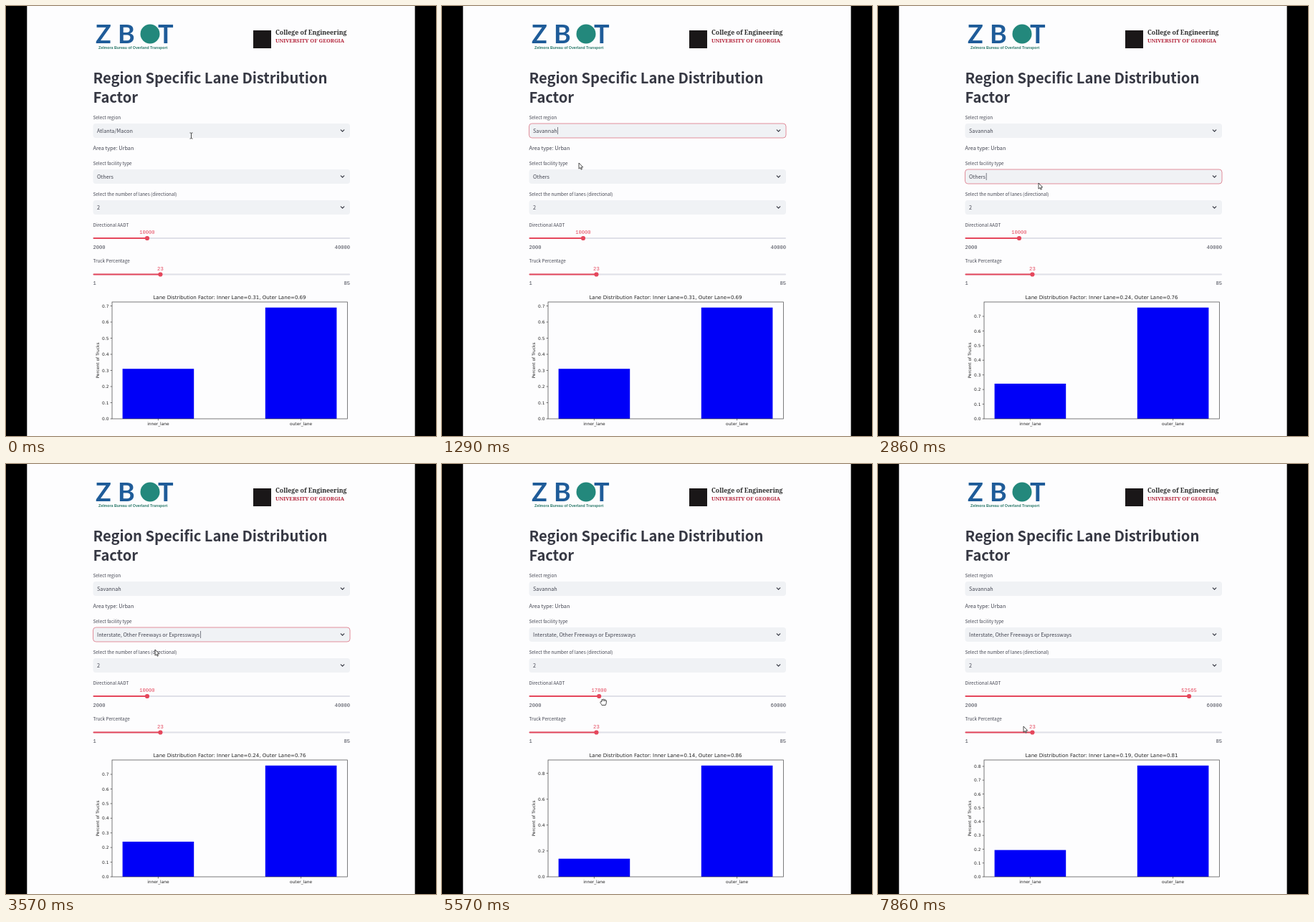
Recreate the animation shown at these times as an HTML page. Size 600 px wide and 600 px high, loop 8000 ms.

```html
<!DOCTYPE html>
<html lang="en">
<head>
<meta charset="utf-8">
<title>Lane Distribution Factor</title>
<style>
  html, body { margin: 0; width: 100%; height: 100%; overflow: hidden; background: #000; }
  svg { display: block; width: 100%; height: 100%; }
  text { fill: #444652; font-family: "Noto Sans CJK JP", "Noto Sans CJK SC", "Noto Sans", sans-serif; }
  .title { font-size: 20.2px; font-weight: 700; letter-spacing: -.003em; fill: #363843; }
  .label { font-size: 6.39px; }
  .field { font-size: 7.33px; }
  .mono { font: 7.13px "Liberation Mono", monospace; }
  .red { fill: #e5475c; }
  .end { text-anchor: end; }
  .mid { text-anchor: middle; }
  .plot text { font: 5.87px "DejaVu Sans", sans-serif; fill: #262626; }
  .plot .head { font-size: 7.05px; }
  .line { fill: none; stroke: #333; stroke-width: .65; }
  .bar { fill: #0000f8; }
  .chevron { fill: none; stroke: #31333f; stroke-width: 1.15; stroke-linecap: round; stroke-linejoin: round; }
  .caret { stroke: #4a4c58; stroke-width: .7; }
  .wordmark { font: 700 36px Lato, sans-serif; fill: #1f5c99; }
  .tagline { font: 700 5.25px "Liberation Sans", sans-serif; fill: #2c7a6b; }
  .college { font: 700 8.75px "Noto Serif", serif; fill: #2a2a2a; }
  .school { font-size: 7.35px; fill: #b3243a; }
</style>
</head>
<body>
<svg viewBox="0 0 600 600">
  <rect x="29.3" width="541.3" height="600" fill="#fdfdfe"/>

  <text class="wordmark" x="125" y="52">Z</text>
  <text class="wordmark" x="156" y="52">B</text>
  <text class="wordmark" x="212" y="52">T</text>
  <circle cx="201" cy="39" r="13.5" fill="#23887c"/>
  <text class="tagline" x="129" y="60">Zelmora Bureau of Overland Transport</text>

  <rect x="345" y="34" width="25" height="25" fill="#1a1718"/>
  <text class="college" x="376" y="40.3">College of Engineering</text>
  <text class="college school" x="376" y="50.8">UNIVERSITY OF GEORGIA</text>

  <text class="title" x="121.5" y="108.3">Region Specific Lane Distribution</text>
  <text class="title" x="121.5" y="135.3">Factor</text>

  <text class="label" x="121.5" y="158">Select region</text>
  <text class="field" x="121.5" y="201.2">Area type: Urban</text>
  <text class="label" x="121.5" y="222">Select facility type</text>
  <text class="label" x="121.5" y="265">Select the number of lanes (directional)</text>
  <text class="label" x="121.5" y="307.7">Directional AADT</text>
  <text class="label" x="121.5" y="358.2">Truck Percentage</text>

  <g id="fields"></g>
  <g id="sliders"></g>
  <g id="plot" class="plot"></g>

  <g id="cursor" stroke="#222" stroke-width=".8" stroke-linejoin="round">
    <path id="beam" fill="none" d="M-2-4H-.6L0-3.5 .6-4H2M0-3.5V3.5M-2 4H-.6L0 3.5 .6 4H2"/>
    <path id="arrow" fill="#fff" d="M0 0V8.2L1.9 6.5 3.1 9.2 4.4 8.6 3.2 6H5.7Z"/>
    <path id="hand" fill="#fff" d="M-2.2 4.5C-2.6 3-4.3 1.8-4.3 .4-4.3-.6-3.2-.8-2.6 0V-2.4C-2.6-3.8-1-3.9-.8-2.8-.6-4.2 1-4.1 1.2-2.9 1.6-3.8 2.8-3.5 2.9-2.3 3.5-2.8 4.4-2.3 4.3-1.2 4.4 1 3.9 3 3.1 4.5ZM-.8-2.8V-1M1.2-2.9V-1M2.9-2.3V-.8"/>
  </g>
</svg>
<script>
const LOOP = 8000, STEP = 1000 / 7;
const LEFT = 121.5, WIDTH = 358.5;
const BASE = 576, TOP = 413;
const $ = id => document.getElementById(id);

// step, x, y
const path = [
  [0, 258.5, 181], [3, 252, 177], [6, 205, 203], [9, 191, 219], [12, 208, 229],
  [16, 235.5, 244.5], [19, 230, 243], [22, 212, 255], [25, 208, 259],
  [29, 200, 290], [34, 181, 332], [36, 177, 332]
];
// step, slider value
const drag = [[36, 10000], [42, 25600], [45, 27787], [50, 52565]];

function track(keys, n, col) {
  const i = keys.findIndex(k => k[0] > n);
  if (i < 0) return keys[keys.length - 1][col];
  if (i === 0) return keys[0][col];
  const a = keys[i - 1], b = keys[i];
  return a[col] + (b[col] - a[col]) * (n - a[0]) / (b[0] - a[0]);
}

const field = (y, value, focus) => `
  <rect x="${LEFT}" y="${y - 10}" width="${WIDTH}" height="20" rx="4" fill="#f0f2f5"
    stroke="${focus ? '#dc7484' : 'none'}" stroke-width=".8"/>
  <text class="field" x="127" y="${y + 2.8}">${value}</text>
  ${focus ? `<path class="caret" d="M0 ${y - 5}v10"/>` : ''}
  <path class="chevron" d="M467.2 ${y - 1.2}l2.3 2.3 2.3-2.3"/>`;

const thumbX = (v, min, max) => LEFT + WIDTH * (v - min) / (max - min);

function slider(y, v, min, max) {
  const x = thumbX(v, min, max);
  return `
  <rect x="${LEFT}" y="${y - 1}" width="${WIDTH}" height="2" rx="1" fill="#dfe0e8"/>
  <rect class="red" x="${LEFT}" y="${y - 1}" width="${x - LEFT}" height="2" rx="1"/>
  <circle class="red" cx="${x}" cy="${y}" r="3.1"/>
  <text class="mono red mid" x="${x}" y="${y - 5.8}">${Math.round(v)}</text>
  <text class="mono" x="${LEFT}" y="${y + 14.6}">${min}</text>
  <text class="mono end" x="480" y="${y + 14.6}">${max}</text>`;
}

function plot(inner, outer, gap) {
  const scale = (BASE - TOP) / 1.05 / outer;
  const bar = (x, v) => `<rect class="bar" x="${x}" y="${BASE - v * scale}" width="99.6" height="${v * scale}"/>`;
  let out = bar(162.6, inner) + bar(361.8, outer);
  for (let k = 0; k * gap < outer * 1.05; k++) {
    const y = BASE - k * gap * scale;
    out += `<path class="line" d="M148 ${y}h-2.4"/>
      <text class="end" x="143.4" y="${y + 2.1}">${(k * gap).toFixed(1)}</text>`;
  }
  ['inner_lane', 'outer_lane'].forEach((name, i) => {
    const x = 212.4 + 199.2 * i;
    out += `<path class="line" d="M${x} ${BASE}v2.4"/><text class="mid" x="${x}" y="584.6">${name}</text>`;
  });
  return out + `
  <rect class="line" x="148" y="${TOP}" width="328.3" height="${BASE - TOP}"/>
  <text class="mid" transform="translate(130.3 494.5) rotate(-90)">Percent of Trucks</text>
  <text class="head mid" x="312" y="409">Lane Distribution Factor: Inner Lane=${inner.toFixed(2)}, Outer Lane=${outer.toFixed(2)}</text>`;
}

function chartAt(n) {
  if (n < 12) return plot(.31, .69, .1);
  if (n < 28) return plot(.24, .76, .1);
  if (n < 41) return plot(.14, .86, .2);
  return plot(.194, .806, .1);
}

function cursorAt(n, thumb) {
  let x = track(path, n, 1), y = track(path, n, 2), kind = 'arrow';
  if (n > 50) {
    const k = (n - 50) / 5;
    x = 440 + (203 - 440) * k;
    y = 332 + (366 - 332) * k;
  } else if (n >= 34) {
    kind = 'hand';
    if (n >= 36) x = thumb + 6;
  } else if (n < 5 || (n > 12 && n < 20)) kind = 'beam';
  $('cursor').setAttribute('transform', `translate(${x} ${y})`);
  for (const id of ['beam', 'arrow', 'hand']) $(id).style.display = id === kind ? '' : 'none';
}

function draw(n) {
  const max = n < 28 ? 40000 : 60000, aadt = track(drag, n, 1);
  $('fields').innerHTML =
    field(174, n < 7 ? 'Atlanta/Macon' : 'Savannah', n >= 3 && n < 18) +
    field(238, n < 22 ? 'Others' : 'Interstate, Other Freeways or Expressways', n >= 18 && n < 36) +
    field(281, 2, false);
  const caret = document.querySelector('.caret');
  if (caret) {
    const box = caret.previousElementSibling.getBBox();
    caret.setAttribute('transform', `translate(${box.x + box.width + .7} 0)`);
  }
  $('sliders').innerHTML = slider(324, aadt, 2000, max) + slider(374.5, 23, 1, 85);
  $('plot').innerHTML = chartAt(n);
  cursorAt(n, thumbX(aadt, 2000, max));
}

const pauses = [17, 24, 43];
let last = -1;
function tick() {
  let n = Math.floor((performance.now() % LOOP + 5) / STEP) % 56;
  if (pauses.includes(n)) n--;
  if (n !== last) draw(last = n);
  requestAnimationFrame(tick);
}
tick();
</script>
</body>
</html>
```
